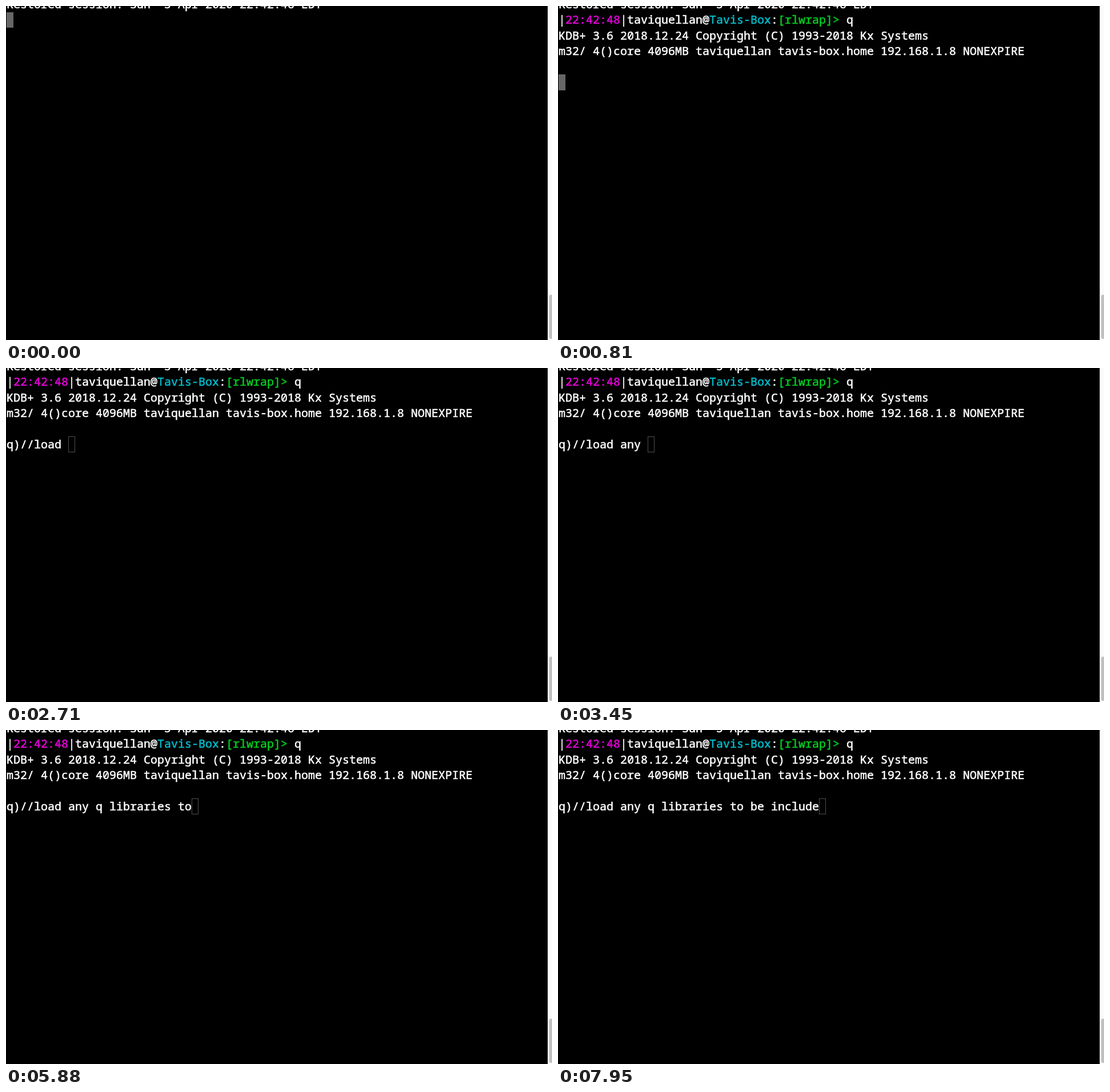
These frames come from a looping animation (956x586 px, 8000 ms). An HTML page:

```html
<!DOCTYPE html>
<html lang="en">
<head>
<meta charset="utf-8">
<title>Terminal session</title>
<style>
  html, body { margin: 0; width: 100%; height: 100%; overflow: hidden; background: #000; }
  svg { display: block; width: 956px; height: 586px; }
  text {
    font: 20px "Noto Sans Mono", "DejaVu Sans Mono", monospace;
    color: #fff; white-space: pre;
  }
  tspan { fill: currentColor; stroke: currentColor; stroke-width: 0.55px; }
</style>
</head>
<body>
<svg id="stage" viewBox="0 0 956 586">
  <rect width="956" height="586"/>
  <rect id="cursor"/>
  <g id="lines"></g>
  <rect x="948.5" width="8" height="586" fill="#fafafa"/>
  <rect x="951" y="506.5" width="9" height="77.5" rx="3" fill="#c1c1c1"/>
</svg>
<script>
const LOOP = 8000, CELL = 12, ROW = 27.35, LEFT = 1;
const SVG = "http://www.w3.org/2000/svg";
const MAGENTA = "#e800dc", CYAN = "#00bccb", GREEN = "#00cb22";
const COMMAND = "q)//load any q libraries to be include";

const cursor = document.getElementById("cursor");
const lines = document.getElementById("lines");

function addRun(text, content, color) {
  const span = document.createElementNS(SVG, "tspan");
  span.textContent = content;
  if (color) span.style.color = color;
  return text.appendChild(span);
}

function addLine(row, ...runs) {
  const text = document.createElementNS(SVG, "text");
  text.setAttribute("x", LEFT);
  text.setAttribute("y", 4 + Math.round(row * ROW));
  for (const [content, color] of runs) addRun(text, content, color);
  return lines.appendChild(text);
}

addLine(0, ["Restored session: Sun  5 Apr 2020 22:42:46 EDT"]);
const prompt = addLine(1, ["|"], ["22:42:48", MAGENTA], ["|taviquellan@"],
  ["Tavis-Box", CYAN], [":"], ["[rlwrap]>", GREEN], [" "]);
const launch = addRun(prompt, "q");
const banner = [
  addLine(2, ["KDB+ 3.6 2018.12.24 Copyright (C) 1993-2018 Kx Systems"]),
  addLine(3, ["m32/ 4()core 4096MB taviquellan tavis-box.home 192.168.1.8 NONEXPIRE"])
];
const input = addLine(5, [""]);

// Evenly spaced keystrokes: [time, characters shown]
function burst(start, end, first, last, steps) {
  return Array.from({ length: steps }, (_, i) => {
    const p = i / (steps - 1);
    return [start + (end - start) * p, Math.round(first + (last - first) * p)];
  });
}

const keys = [
  ...burst(1620, 1760, 2, 3, 2),
  ...burst(2070, 2230, 4, 5, 2),
  ...burst(2347, 3050, 6, 12, 7),
  ...burst(3450, 3530, 13, 14, 2),
  ...burst(3745, 3960, 15, 17, 2),
  ...burst(4420, 4670, 18, 20, 2),
  ...burst(4980, 5140, 21, 22, 2),
  ...burst(5288, 5880, 23, 27, 5),
  ...burst(6100, 6780, 28, 32, 5),
  ...burst(7140, 7500, 33, 36, 3),
  ...burst(7780, 7950, 37, 38, 2)
];

function show(node, on) {
  node.style.display = on ? "" : "none";
}

function placeCursor(row, column, focused) {
  const inset = focused ? 0 : 0.5;
  const attributes = {
    x: LEFT + column * CELL + inset,
    y: Math.round(11 + (row - 1) * ROW) + inset,
    width: CELL - 2 * inset,
    height: (row === 1 ? 27 : 28) - 2 * inset,
    fill: focused ? "#666" : "none",
    stroke: focused ? "none" : "#4d4d4d"
  };
  for (const name in attributes) cursor.setAttribute(name, attributes[name]);
}

function draw(t) {
  let count = 0;
  for (const [time, shown] of keys) if (t >= time) count = shown;
  show(prompt, t >= 620);
  show(launch, t >= 715);
  banner.forEach(line => show(line, t >= 810));
  input.firstChild.textContent = COMMAND.slice(0, count);

  if (t < 620) placeCursor(1, 0, true);
  else if (t < 715) placeCursor(1, 42, true);
  else if (t < 810) placeCursor(2, 0, true);
  else placeCursor(5, count, count <= 8);
}

const begin = performance.now();
function tick() {
  draw((performance.now() - begin) % LOOP);
  requestAnimationFrame(tick);
}
tick();
</script>
</body>
</html>
```
